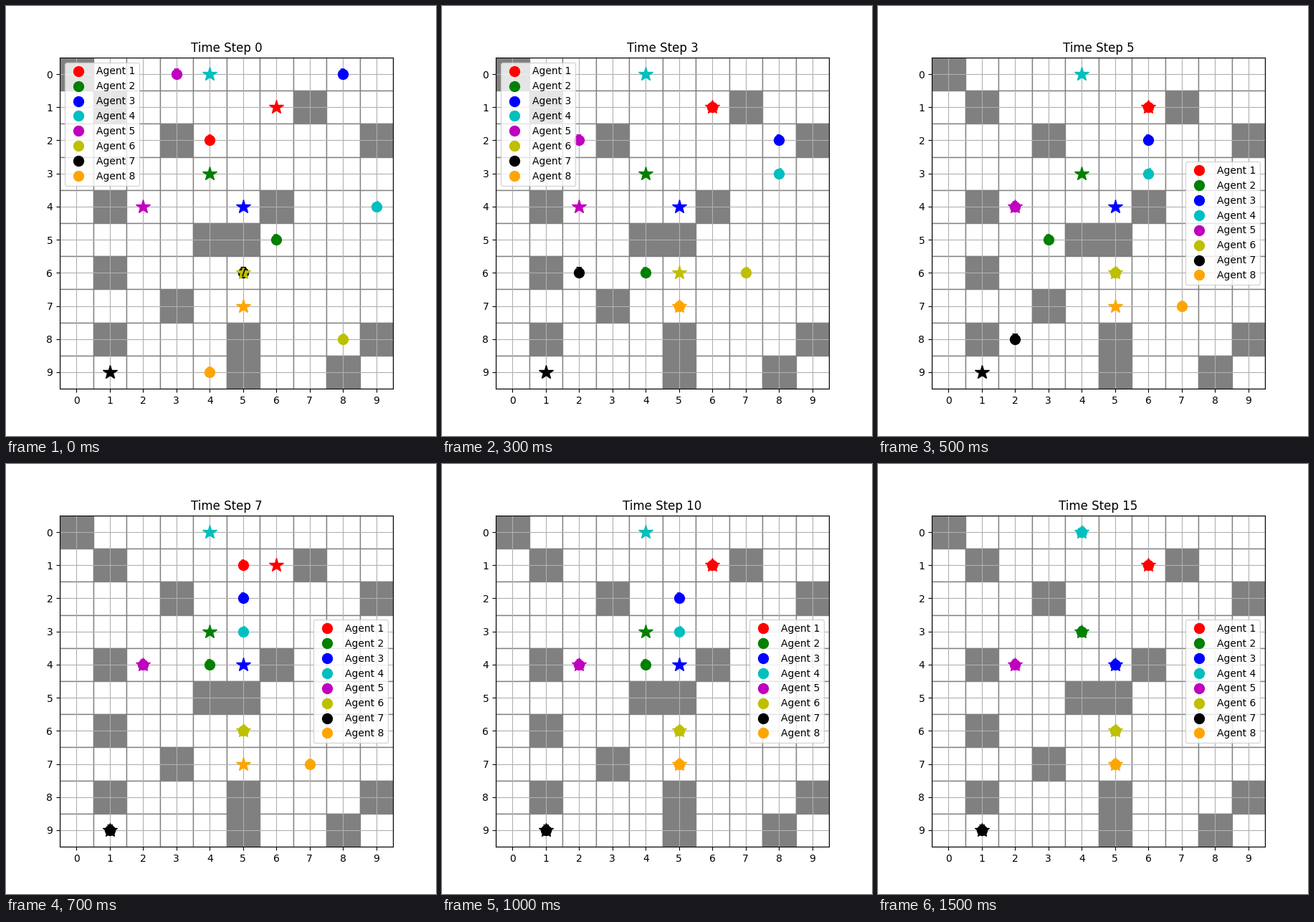
Animation of 600 by 600 pixels, one loop 1600 ms. Source, as a matplotlib script:

```python
import matplotlib.pyplot as plt
from matplotlib.animation import FuncAnimation
from matplotlib.patches import Rectangle

SIZE = 10
STEPS = 16
COLORS = ["r", "g", "b", "c", "m", "y", "k", "orange"]
OBSTACLES = {(0, 0), (1, 1), (7, 1), (3, 2), (9, 2), (1, 4), (6, 4), (4, 5),
             (5, 5), (1, 6), (3, 7), (1, 8), (5, 8), (9, 8), (5, 9), (8, 9)}
GOALS = [(6, 1), (4, 3), (5, 4), (4, 0), (2, 4), (5, 6), (1, 9), (5, 7)]

# Start cell and one move per step; "Q" is up-left, "." waits.
ROUTES = [
    ((4, 2), "RRU...LR....LR."),
    ((6, 5), "DLLLUUR....U..."),
    ((8, 0), "D.DLLL.....RDLD"),
    ((9, 4), "U.LLLL......UUQ"),
    ((3, 0), "LDDDD"),
    ((8, 8), "UULLL"),
    ((5, 6), "LLLDDDL"),
    ((4, 9), "UURRRRLLL"),
]
MOVES = {"L": (-1, 0), "R": (1, 0), "U": (0, -1), "D": (0, 1),
         "Q": (-1, -1), ".": (0, 0)}


def walk(start, moves):
    cells = [start]
    for move in moves.ljust(STEPS - 1, "."):
        x, y = cells[-1]
        dx, dy = MOVES[move]
        cells.append((x + dx, y + dy))
    return cells


paths = [walk(*route) for route in ROUTES]

fig, ax = plt.subplots(figsize=(6, 6), dpi=100)
ax.set_xlim(-0.5, SIZE - 0.5)
ax.set_ylim(SIZE - 0.5, -0.5)
ax.set_xticks(range(SIZE))
ax.set_yticks(range(SIZE))
ax.grid(True)

for y in range(SIZE):
    for x in range(SIZE):
        face = "gray" if (x, y) in OBSTACLES else "white"
        ax.add_patch(Rectangle((x - 0.5, y - 0.5), 1, 1,
                               facecolor=face, edgecolor="gray"))

dots, tags = [], []
for i, color in enumerate(COLORS, 1):
    dots += ax.plot([], [], "o", color=color, markersize=10,
                    label=f"Agent {i}")
    tags.append(ax.text(0, 0, str(i), color=color, fontsize=12,
                        ha="center", va="center"))
for (x, y), color in zip(GOALS, COLORS):
    ax.plot(x, y, "*", color=color, markersize=15)


def update(step):
    for path, dot, tag in zip(paths, dots, tags):
        x, y = path[step]
        dot.set_data([x], [y])
        tag.set_position((x, y))
    ax.legend(loc="upper left" if step < 4 else "center right")
    ax.set_title(f"Time Step {step}")
    return dots + tags


anim = FuncAnimation(fig, update, frames=STEPS, interval=100,
                     repeat=True, repeat_delay=0)
plt.show()
```
